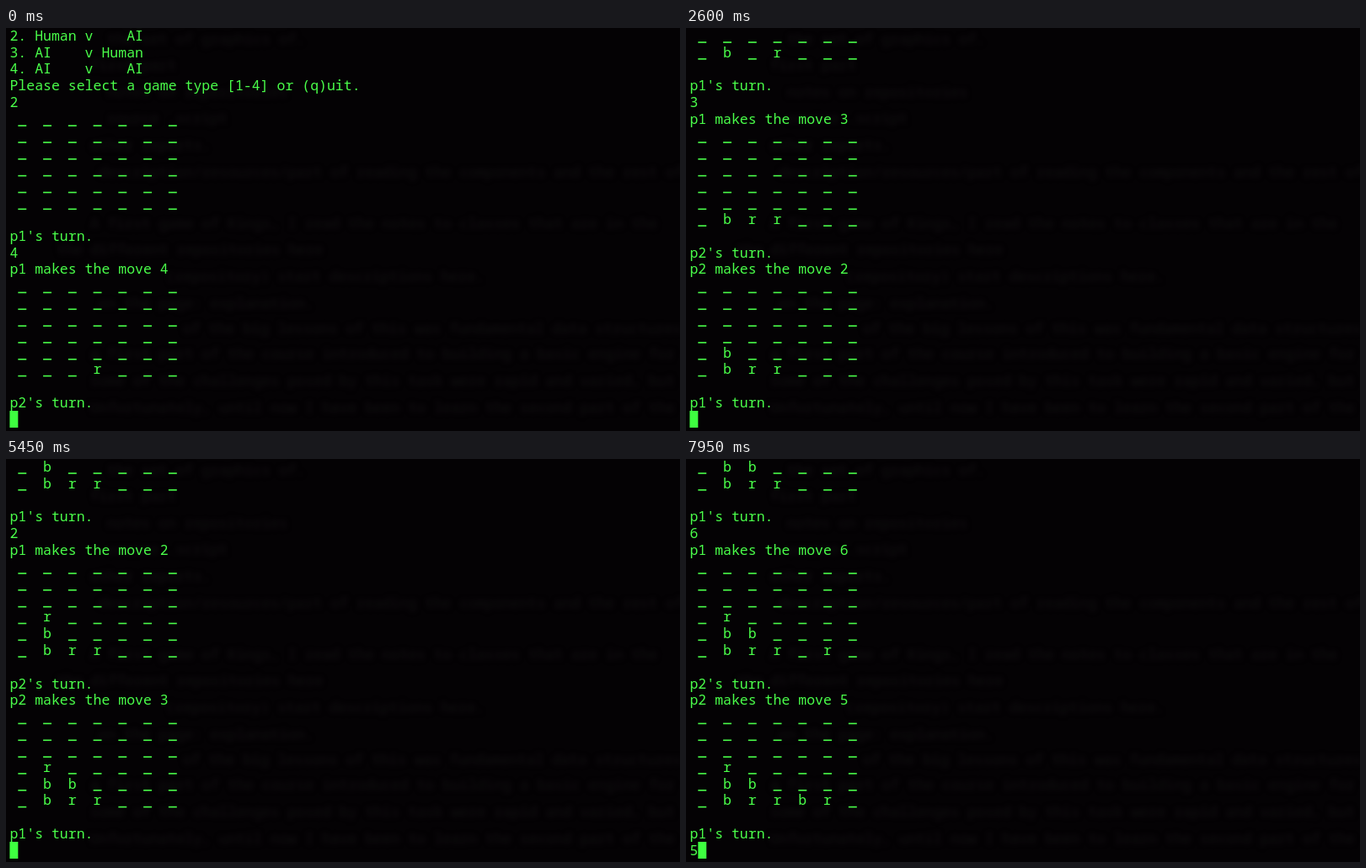
Recreate the animation shown at these times as an HTML page with a canvas. Size 800 by 479 pixels, loop 8000 ms.

```html
<!DOCTYPE html>
<html lang="en">
<head>
<meta charset="utf-8">
<title>Four in a row in a terminal</title>
<style>
  html, body { margin: 0; width: 100%; height: 100%; overflow: hidden; background: #040204; }
  canvas { display: block; }
</style>
</head>
<body>
<canvas id="screen" width="800" height="479"></canvas>
<script>
const LOOP = 8000, ROWS = 24;
const LEFT = 4.4, CHAR = 9.92, LINE = 19.83, BASE = 14.8;
const GREEN = '#4aff4a', CURSOR = '#3eff40';
const MONO = '"Noto Sans Mono", "DejaVu Sans Mono", monospace';
const ctx = document.getElementById('screen').getContext('2d');

// Game log
const grid = Array.from({ length: 6 }, () => Array(7).fill('_'));
const boardLines = () => grid.map(row => ' ' + row.join('  '));
const log = [
  '2. Human v    AI',
  '3. AI    v Human',
  '4. AI    v    AI',
  'Please select a game type [1-4] or (q)uit.',
  '2', ...boardLines(), '', "p1's turn."
];
const states = [];

function show(time, typed = '') {
  states.push({ time, lines: [...log.slice(1 - ROWS), typed] });
}

function move(time, player, col) {
  if (player === 1) log.push(String(col));
  const row = grid.findLastIndex(r => r[col - 1] === '_');
  grid[row][col - 1] = player === 1 ? 'r' : 'b';
  log.push(`p${player} makes the move ${col}`, ...boardLines(), '', `p${3 - player}'s turn.`);
  show(time);
}

move(0, 1, 4);
move(400, 2, 2);
show(1000, '3');
move(1600, 1, 3);
move(2450, 2, 2);
show(2800, '2');
move(3100, 1, 2);
move(4600, 2, 3);
show(5700, '6');
move(5950, 1, 6);
move(6850, 2, 5);
show(7850, '5');

// Blurred page showing faintly through the window: [x, y, text]
const page = [
  [120, 14, 'the set of graphics of.'],
  [100, 45, 'first part'],
  [120, 77, 'notes on repositories'],
  [120, 108, 'source .script'],
  [100, 140, 'other reports.'],
  [110, 172, 'description/resources/part of reading the components and the rest of'],
  [100, 233, 'A first game of Kings, I read the notes to classes that are in the'],
  [60, 264, 'the different repositories here'],
  [190, 296, '(repository) start descriptions here.'],
  [110, 328, 'on the page: explanation.'],
  [210, 358, 'of the big lessons of this was fundamental data structures'],
  [100, 388, 'a first part of the course introduced to building a basic engine for'],
  [100, 420, 'some of the challenges posed by this task were rapid and varied, but'],
  [100, 452, 'Unfortunately, until now I have been to learn the second part of the']
];
const backdrop = document.createElement('canvas');
backdrop.width = 800;
backdrop.height = 479;
const back = backdrop.getContext('2d');
back.fillStyle = '#040204';
back.fillRect(0, 0, 800, 479);
back.filter = 'blur(3px)';
back.fillStyle = '#121012';
back.font = '17px ' + MONO;
back.textBaseline = 'middle';
for (const [x, y, text] of page) back.fillText(text, x, y);

function drawLine(text, row) {
  const y = BASE + row * LINE;
  ctx.fillText(text.replaceAll('_', ' '), LEFT, y);
  [...text].forEach((c, i) => {
    if (c === '_') ctx.fillRect(LEFT + i * CHAR, y + 1.4, CHAR, 1.6);
  });
}

function frame(now) {
  const time = now % LOOP;
  const { lines } = states.findLast(s => s.time <= time);
  ctx.drawImage(backdrop, 0, 0);
  ctx.font = '16.53px ' + MONO;
  ctx.fillStyle = GREEN;
  lines.forEach(drawLine);
  ctx.fillStyle = CURSOR;
  ctx.fillRect(LEFT + lines[ROWS - 1].length * CHAR, 455, CHAR, 20);
  requestAnimationFrame(frame);
}
requestAnimationFrame(frame);
</script>
</body>
</html>
```
